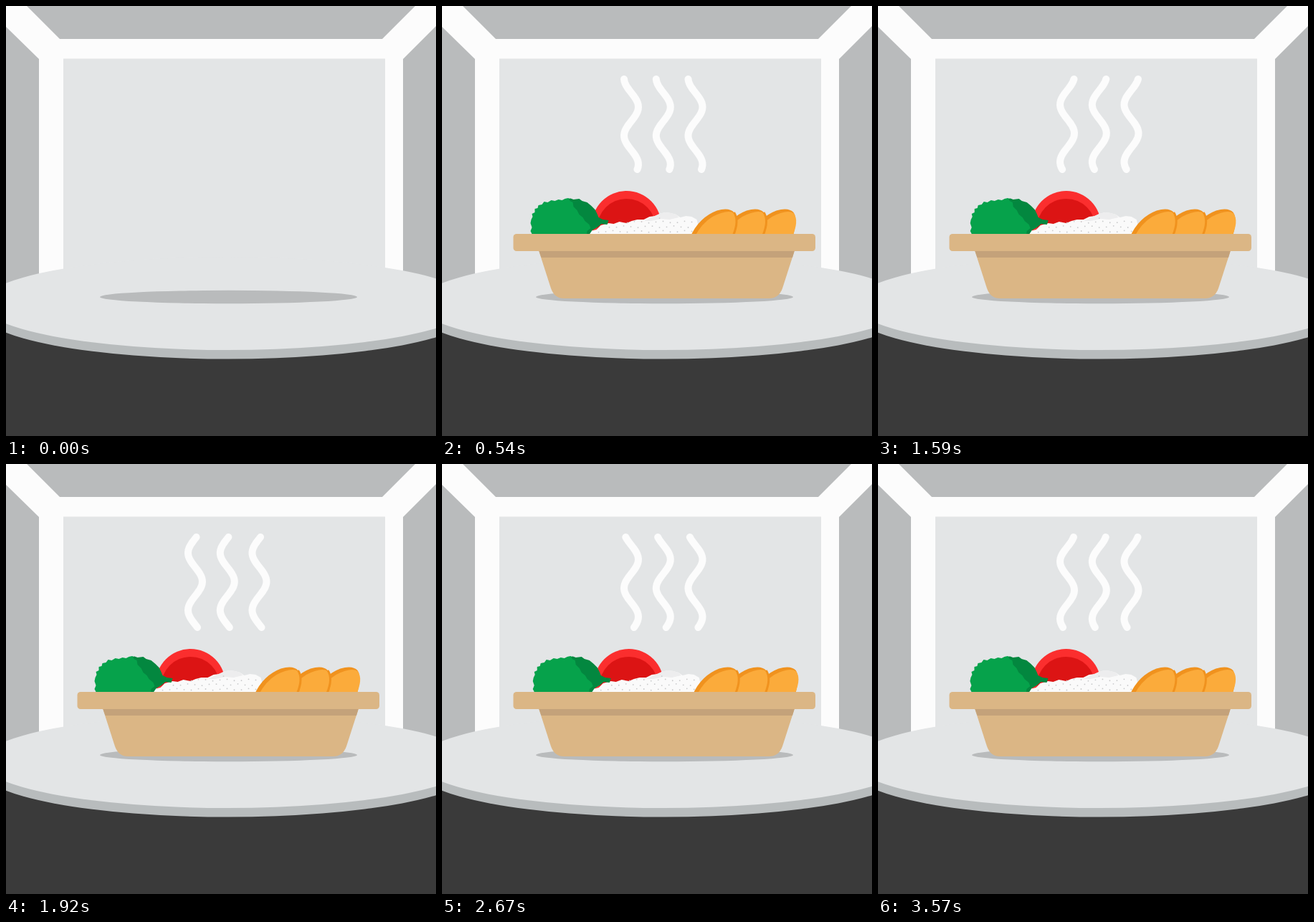
These frames come from a looping animation (600 by 600 pixels, 3.6 s). An HTML page:

```html
<!DOCTYPE html>
<html lang="en">
<head>
<meta charset="utf-8">
<title>Microwave meal</title>
<style>
  html, body { margin: 0; width: 100%; height: 100%; overflow: hidden; background: #fcfcfc; }
  svg { display: block; width: 100vw; height: 100vh; }
</style>
</head>
<body>
<svg viewBox="0 0 600 600">
  <!-- oven -->
  <rect width="600" height="600" fill="#fcfcfc"/>
  <g fill="#b9bbbc">
    <path d="M29 0H571L525 46H75Z"/>
    <path d="M0 29L46 74V430H0Z"/>
    <path d="M600 28L554 74V430H600Z"/>
  </g>
  <rect x="80" y="73.5" width="449" height="330" fill="#e3e5e6"/>
  <rect y="430" width="600" height="170" fill="#3a3a3a"/>
  <ellipse cx="309.5" cy="427.5" rx="344" ry="65" fill="#b8bcbd"/>
  <ellipse cx="309.5" cy="415" rx="344" ry="65" fill="#e3e5e6"/>
  <ellipse cx="310.5" cy="406" rx="179.5" ry="9.3" fill="#b9bbbc"/>

  <g id="meal">
    <g id="steam" fill="none" stroke="#fcfcfc" stroke-width="10" stroke-linecap="round" stroke-linejoin="round"></g>
    <g id="food">
      <circle cx="262" cy="306.5" r="48.5" fill="#fb2e2e"/>
      <circle cx="262" cy="310" r="41" fill="#dc1414"/>
      <path id="rice" fill="#fafafa" d="M206 322L212 314L220 312L226 306L237 303L244 304L252 301L262 303L269 300L277 298L286 298L294 294L302 293L308 290L316 288L324 289L331 291L337 295L345 293L353 294L360 298L366 322Z"/>
      <path fill="#ededee" d="M300 293.500L308 290L316 288L324 289L331 291L335 295L322 298L310 297L296 300L286 300Z"/>
      <g id="grains" fill="#c9cacb"></g>
      <path fill="#03873f" d="M176 269L184 268.500L188 270L196 269L200 272L207 274L213 279L218 284L221 290L223 295L229 298L237 299L235 305L227 304L221 309L214 313L208 322H170Z"/>
      <path fill="#06a24b" d="M132 322L128 314L130 309L128 303L129 298L131 294L130 290L134 288L134 283L138 282L139 278L144 277L147 273L152 274L157 271L162 272L167 270L172 271L176 269L181 268L183 272L187 274L188 280L193 285L196 291L201 295L204 300L210 305L212 310L207 314L206 322Z"/>
      <g id="slices"></g>
    </g>
    <path fill="#dbb685" d="M134 338H493L475 394Q470 408 456 408H170Q157 408 152 394Z"/>
    <path fill="#c4a27a" d="M135 341H492L489 351H138.500Z"/>
    <rect x="99.500" y="318" width="421.500" height="24" rx="4.500" fill="#dbb685"/>
  </g>
</svg>
<script>
const NS = 'http://www.w3.org/2000/svg';
const $ = id => document.getElementById(id);
const add = (parent, tag, attrs) => {
  const el = document.createElementNS(NS, tag);
  for (const k in attrs) el.setAttribute(k, attrs[k]);
  return parent.appendChild(el);
};

// Orange slices, rear one first
for (const i of [2, 1, 0]) {
  const g = add($('slices'), 'g', { transform: `translate(${i * 41.5})` });
  add(g, 'path', { fill: '#f0921e', d: 'M351 322Q363 295 388 285.500Q405 280.500 412 288Q418 297 411 322Z' });
  add(g, 'path', { fill: '#fbab3b', d: 'M357 322Q367 303 382 294Q404 283 412.500 289.500Q420 300 410 322Z' });
  if (i < 2) add(g, 'path', {
    fill: 'none', stroke: '#f0921e', 'stroke-width': 3,
    d: 'M412 288Q419.500 299 411 320'
  });
}

// Rice speckles
const rice = $('rice');
for (let row = 0; row < 4; row++) {
  for (let x = 218 + (row % 2) * 5; x < 358; x += 10) {
    const y = 295 + row * 6.5 + Math.sin(x * 1.7) * 1.2;
    const top = x < 310 ? 311 - (x - 216) * 0.19 : 297;
    if (y > top) add($('grains'), 'circle', { cx: x, cy: y, r: 0.9 });
  }
}

const LOOP = 3600, WAVE = 80;
const waves = [264, 308.8, 353.5].map(x => ({ x, el: add($('steam'), 'path', {}) }));

const out = p => 1 - (1 - p) ** 2;
const swing = p => (1 - Math.cos(Math.PI * p)) / 2;

// Steps: [time, value, easing used to get there]
const SLIDE = [[0, 520], [330, -17, out], [510, 0, swing], [LOOP, 0, swing]];
const SWAY = [[0, 0], [180, 0, swing], [420, -5.5, swing], [1070, 6.5, swing],
              [2150, -5.8, swing], [3060, 1.6, swing], [LOOP, 0.4, swing]];

function at(steps, t) {
  const i = Math.max(1, steps.findIndex(s => s[0] > t));
  const [t0, a] = steps[i - 1], [t1, b, ease] = steps[i];
  return a + (b - a) * ease((t - t0) / (t1 - t0));
}

function steamPath(x, crest) {
  let d = '';
  for (let y = 102; y <= 228; y += 3) {
    const px = x + 10 * Math.cos((y - crest) / WAVE * 2 * Math.PI);
    d += (d ? 'L' : 'M') + px.toFixed(2) + ' ' + y;
  }
  return d;
}

function draw() {
  const t = performance.now() % LOOP;
  $('meal').setAttribute('transform', `translate(${at(SLIDE, t)})`);
  $('food').setAttribute('transform', `translate(${at(SWAY, t)})`);
  const crest = 163.2 - 0.0412 * t;
  for (const w of waves) w.el.setAttribute('d', steamPath(w.x, crest));
  requestAnimationFrame(draw);
}
draw();
</script>
</body>
</html>
```
